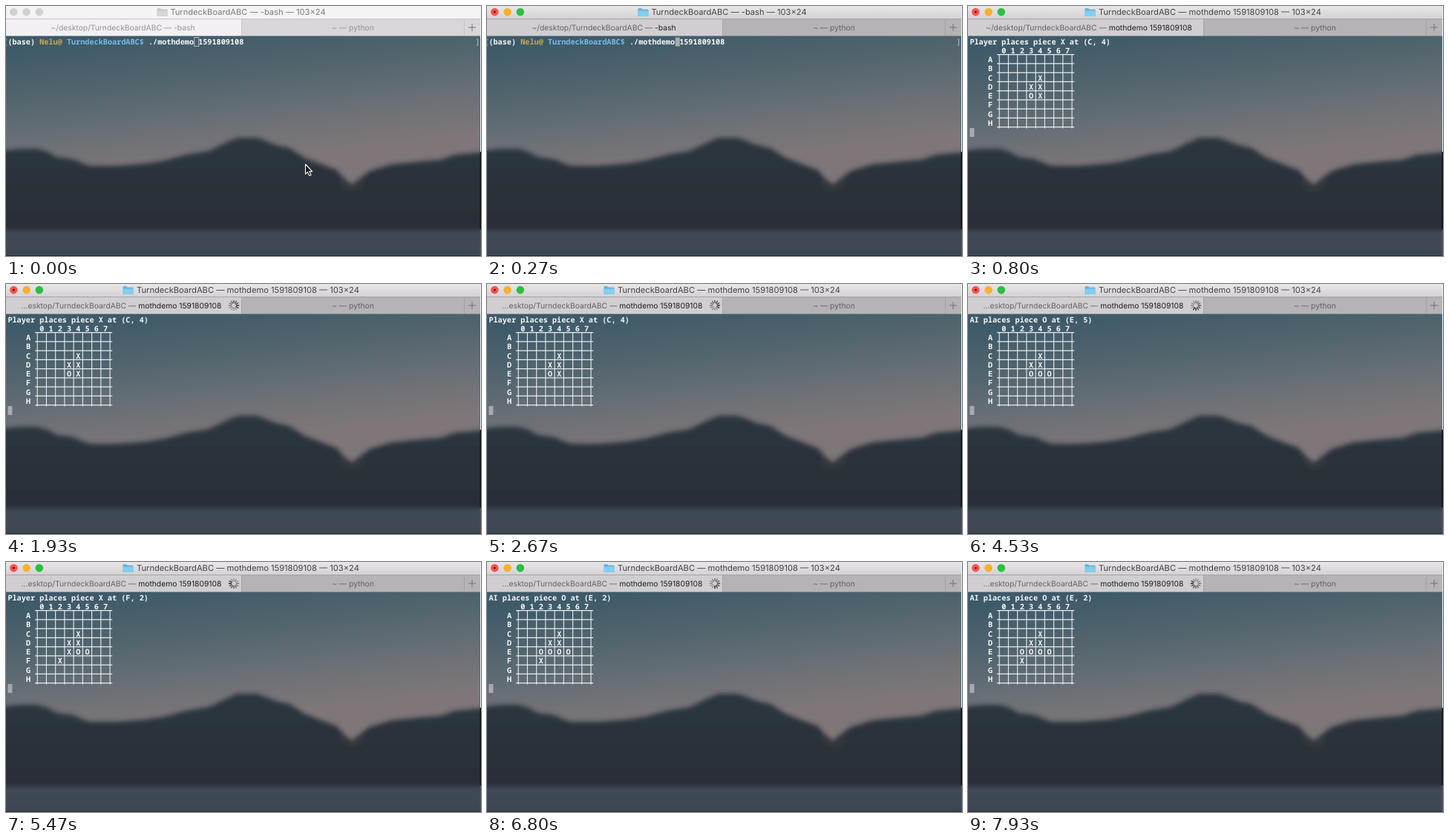
An HTML page that plays this animation: 640x338 px, repeating every 8000 ms.

```html
<!DOCTYPE html>
<html lang="en">
<head>
<meta charset="utf-8">
<title>Terminal board game</title>
<style>
  html, body { margin: 0; width: 100%; height: 100%; overflow: hidden; background: #2b313a; }
  svg { display: block; width: 100vw; height: 100vh; }
  text { white-space: pre; text-rendering: geometricPrecision; }
  .ui { font-family: Inter, "Open Sans", sans-serif; text-anchor: middle; }
  .mono { font: 600 10.2px "Noto Sans Mono", "DejaVu Sans Mono", monospace; fill: #f6f7f8; }
  #title { font-size: 11.15px; fill: #454345; }
  .tab { font-size: 10.3px; fill: #636163; }
  #job { fill: #1f1e1f; }
  .bar { fill: url(#barOn); }
  .front { fill: #d0ced1; }
  .back { fill: #b5b3b6; }
  .edge { stroke: #a4a2a5; }
  .idle #title { fill: #7d7b7d; }
  .idle .tab, .idle #job { fill: #969496; }
  .idle .bar { fill: #f5f3f5; }
  .idle .front { fill: #f2f0f2; }
  .idle .back { fill: #d8d6d8; }
  .idle .edge { stroke: #c5c3c5; }
  .idle .light { fill: #d2d0d2; }
  .idle #dot { display: none; }
  .idle #folder { opacity: .55; filter: grayscale(1); }
  .grid { stroke: #e9edef; stroke-width: 1.1; }
</style>
</head>
<body>
<svg id="stage" viewBox="0 0 640 338" preserveAspectRatio="none">
  <defs>
    <linearGradient id="sky" gradientUnits="userSpaceOnUse" x1="265" y1="30" x2="285" y2="210">
      <stop offset="0" stop-color="#3e5a69"/>
      <stop offset=".38" stop-color="#53656e"/>
      <stop offset=".7" stop-color="#6a7076"/>
      <stop offset="1" stop-color="#7e7678"/>
    </linearGradient>
    <linearGradient id="hill" x1="0" y1="0" x2="0" y2="1">
      <stop offset="0" stop-color="#2d373f"/>
      <stop offset=".5" stop-color="#2a3038"/>
      <stop offset="1" stop-color="#2a2e37"/>
    </linearGradient>
    <linearGradient id="lake" x1="0" y1="0" x2="0" y2="1">
      <stop offset="0" stop-color="#414957"/>
      <stop offset="1" stop-color="#3c4350"/>
    </linearGradient>
    <linearGradient id="barOn" x1="0" y1="0" x2="0" y2="1">
      <stop offset="0" stop-color="#e8e6e8"/>
      <stop offset="1" stop-color="#d3d1d4"/>
    </linearGradient>
    <filter id="soft" x="-5%" y="-10%" width="110%" height="120%"><feGaussianBlur stdDeviation="3"/></filter>
  </defs>

  <!-- wallpaper behind the translucent window -->
  <rect y="38" width="640" height="300" fill="url(#sky)"/>
  <path filter="url(#soft)" fill="url(#hill)" d="M-20 197 L0 195 20 193 42 193 56 197 68 204 90 207 112 216 150 216 188 213 213 209 243 201 273 196 298 184 312 178 338 178 349 182 364 188 382 192 402 205 430 216 446 222 455 233 466 242 477 233 490 223 520 214 560 210 585 208 605 201 640 198 660 196 V350 H-20Z"/>
  <path d="M451 234 Q466 264 482 234" fill="none" stroke="#65595a" stroke-width="6" opacity=".2" filter="url(#soft)"/>
  <rect x="-20" y="303" width="680" height="60" fill="url(#lake)" filter="url(#soft)"/>
  <path d="M0 337.5H640" stroke="#252a33"/>
  <path d="M638.6 40V197" stroke="#3b6e86" stroke-width=".8"/>
  <path d="M639.5 0V197" stroke="#f1f3f4"/>
  <path d="M639.3 197V302" stroke="#0b0d10" stroke-width="1.4"/>
  <path d="M639.3 302V338" stroke="#4b5263" stroke-width="1.4"/>

  <!-- window frame -->
  <rect class="bar" width="639" height="18"/>
  <rect class="front" y="18" width="317" height="22.5"/>
  <rect class="back" x="317" y="18" width="322" height="22.5"/>
  <path class="edge" fill="none" d="M0 17.5H639M317.5 18V40M617.5 18V40"/>
  <path d="M623 29H633M628 24V34" stroke="#737173"/>
  <circle class="light" cx="10.3" cy="8.1" r="5.3" fill="#fb5550"/>
  <circle class="light" cx="27.6" cy="8.1" r="5.3" fill="#f8b02e"/>
  <circle class="light" cx="44.8" cy="8.1" r="5.3" fill="#28c03f"/>
  <circle id="dot" cx="10.3" cy="8.1" r="1.7" fill="#7e1512"/>
  <g id="folder">
    <path fill="#62b4de" d="M0 1.2Q0 0 1.2 0H4.5L6 1.5H12.8Q14 1.5 14 2.7V11H0Z"/>
    <path fill="#85cdf0" d="M0 3.5H14V10.2Q14 11 13 11H1Q0 11 0 10.2Z"/>
  </g>
  <text id="title" class="ui" x="326" y="12.3"></text>
  <text id="tab" class="ui tab" y="33"><tspan id="path"></tspan><tspan id="job"></tspan></text>
  <text class="ui tab" x="467.5" y="33">~ — python</text>
  <g id="spinner" stroke="#1c1b1c" stroke-width="1.3" stroke-linecap="round"></g>

  <!-- shell prompt -->
  <g id="prompt">
    <text class="mono" x="-3.4" y="51.7" style="fill:#a3abb0">[</text>
    <text class="mono" x="632.6" y="51.7" style="fill:#a3abb0">]</text>
    <text class="mono" x="2.4" y="51.7">(base) <tspan fill="#c9a94f">Nelu@</tspan> <tspan fill="#76bde8">TurndeckBoardABC$</tspan> ./mothdemo 1591809108</text>
  </g>

  <!-- game -->
  <g id="game">
    <text id="status" class="mono" x="2.4" y="51.7"></text>
    <g id="board"></g>
    <g id="pieces"></g>
  </g>
  <rect id="caret" width="6" height="12"/>
  <path id="pointer" fill="#15171a" stroke="#fff" stroke-width="1.1" stroke-linejoin="round" d="M403.5 214V227.2L406.5 224.4 408.6 229.4 411 228.4 408.9 223.6H412.6Z"/>
</svg>
<script>
const LOOP = 8000, FOCUS = 70, HIDE_POINTER = 200, RUN = 700, BUSY = 1200, TURN = 2000;
const CELL = 6.12, LINE = 12.25, LEFT = 2.4, BASE = 51.7;
const PROJECT = "TurndeckBoardABC", COMMAND = "mothdemo 1591809108", SIZE = "103×24";
const TURNS = [
  ["Player places piece X at (C, 4)", "C4X D3X D4X E3O E4X"],
  ["AI places piece O at (E, 5)", "C4X D3X D4X E3O E4O E5O"],
  ["Player places piece X at (F, 2)", "C4X D3X D4X E3X E4O E5O F2X"],
  ["AI places piece O at (E, 2)", "C4X D3X D4X E2O E3O E4O E5O F2X"]
];

const $ = id => document.getElementById(id);
const colX = col => LEFT + col * CELL;
const rowY = row => BASE + row * LINE;
const show = (id, on) => { $(id).style.display = on ? "" : "none"; };

function add(parent, tag, attrs, text = "") {
  const el = document.createElementNS("http://www.w3.org/2000/svg", tag);
  for (const name in attrs) el.setAttribute(name, attrs[name]);
  el.textContent = text;
  parent.append(el);
}
const glyph = (parent, col, row, char) =>
  add(parent, "text", { class: "mono", x: colX(col), y: rowY(row) }, char);

function buildBoard() {
  const board = $("board");
  for (let i = 0; i <= 8; i++) {
    const x = colX(6.5 + 2 * i), y = 65.6 + LINE * i;
    add(board, "line", { class: "grid", x1: colX(6), x2: colX(23), y1: y, y2: y });
    add(board, "line", { class: "grid", x1: x, x2: x, y1: 66, y2: 165.6 });
    if (i < 8) {
      glyph(board, 7 + 2 * i, 1, i);
      glyph(board, 4, 2 + i, "ABCDEFGH"[i]);
    }
  }
}

function buildSpinner() {
  for (let i = 0; i < 12; i++)
    add($("spinner"), "line", { y1: -3.4, y2: -6.6, transform: `rotate(${-30 * i})`, opacity: Math.max(.4, 1 - i * .07) });
}

function setPhase(phase) {
  const running = phase >= 2, busy = phase === 3;
  $("stage").classList.toggle("idle", phase === 0);
  show("prompt", !running);
  show("game", running);
  show("spinner", busy);

  const job = running ? COMMAND : "-bash";
  $("title").textContent = `${PROJECT} — ${job} — ${SIZE}`;
  $("folder").setAttribute("transform", `translate(${running ? 157.5 : 203.5} 3)`);
  $("path").textContent = `${busy ? "...esktop" : "~/desktop"}/${PROJECT} — `;
  $("job").textContent = job;
  $("tab").setAttribute("x", busy ? 155.5 : running ? 163 : 157.5);

  const caret = $("caret"), hollow = phase === 0;
  caret.setAttribute("x", running ? LEFT : colX(41) + .4);
  caret.setAttribute("y", running ? 165 : 42.5);
  caret.setAttribute("fill", hollow ? "none" : "#a8aaad");
  caret.setAttribute("stroke", hollow ? "#b4b8bb" : "none");
}

function setTurn(turn) {
  const [status, pieces] = TURNS[turn];
  $("status").textContent = status;
  $("pieces").replaceChildren();
  for (const [row, col, mark] of pieces.split(" "))
    glyph($("pieces"), 7 + 2 * col, 2 + "ABCDEFGH".indexOf(row), mark);
}

let lastPhase, lastTurn;
function draw(now) {
  const t = now % LOOP;
  const phase = [FOCUS, RUN, BUSY].filter(start => t >= start).length;
  const turn = Math.max(0, Math.floor((t - RUN) / TURN));
  if (phase !== lastPhase) setPhase(lastPhase = phase);
  if (turn !== lastTurn) setTurn(lastTurn = turn);
  show("pointer", t < HIDE_POINTER);
  const angle = Math.floor(t * 12 / 800) * 30 % 360;
  $("spinner").setAttribute("transform", `translate(307 29) rotate(${angle})`);
}

buildBoard();
buildSpinner();
const start = performance.now();
(function frame() {
  draw(performance.now() - start);
  requestAnimationFrame(frame);
})();
</script>
</body>
</html>
```
